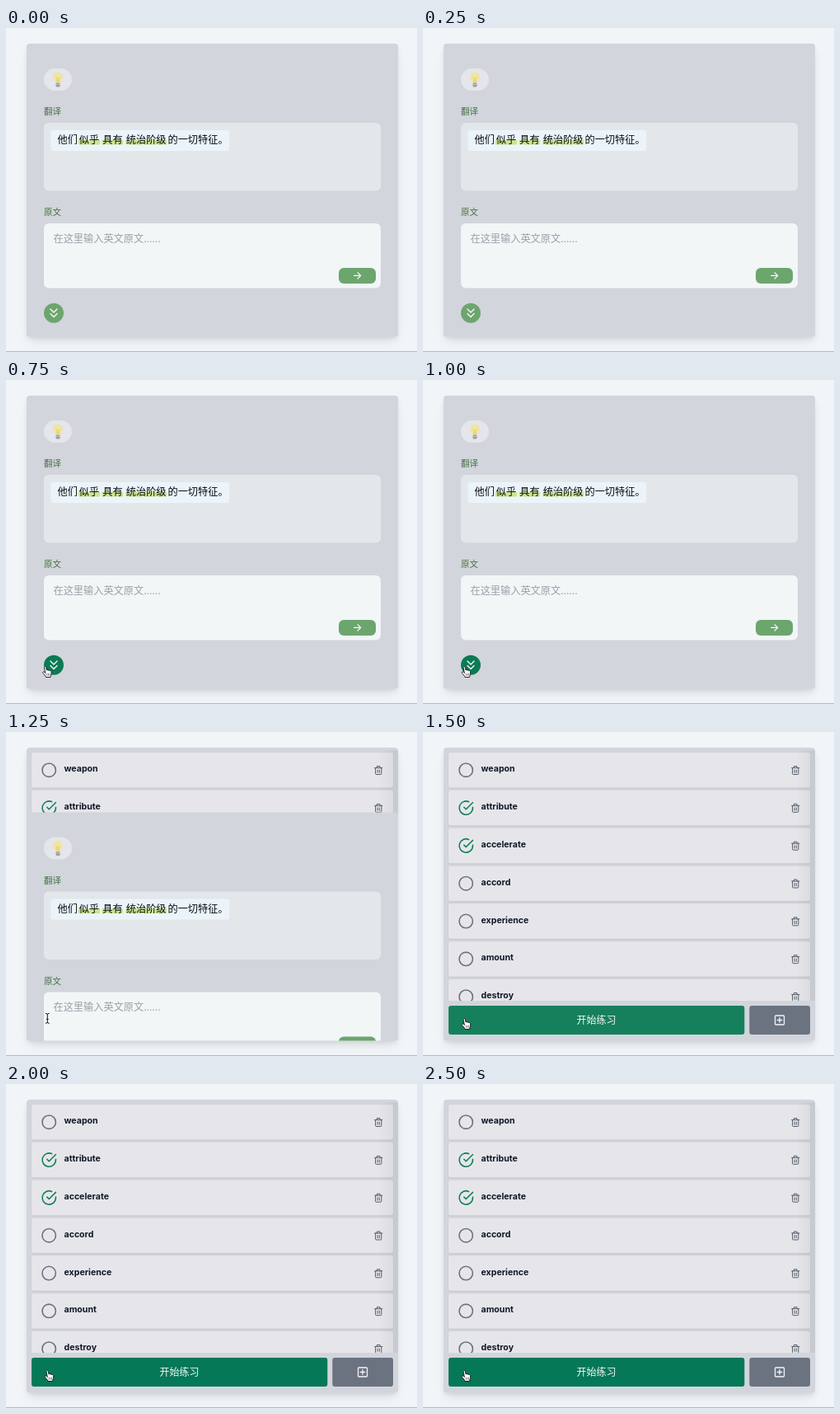
Animation of 499 by 393 pixels, one loop 2.75 s. Source, as an HTML page with a canvas:

```html
<!DOCTYPE html>
<html lang="zh-CN">
<head>
<meta charset="utf-8">
<title>Word practice</title>
<style>
html, body { margin: 0; width: 100%; height: 100%; overflow: hidden; background: #f1f5f7; }
canvas { display: block; width: 499px; height: 393px; }
</style>
</head>
<body>
<canvas id="stage"></canvas>
<script>
const W = 499, H = 393, LOOP = 2750, STEP = 250;
const CJK = '"Noto Sans CJK SC", "Noto Sans CJK", sans-serif';
const LATIN = 'Inter, sans-serif';
const COLOR = {
  page: '#f1f5f7', card: '#d2d5dc', row: '#e6e6ea', field: '#e4e7ea', input: '#f2f6f7',
  label: '#42703f', leaf: '#6da56e', hover: '#0b7a55', deep: '#047857', gray: '#6b7280'
};
const WORDS = ['weapon', 'attribute', 'accelerate', 'accord', 'experience', 'amount', 'destroy'];
const CHECKED = new Set([1, 2]);
const CARD = [25, 19, 451, 355.5, 4];

const canvas = document.getElementById('stage');
const ctx = canvas.getContext('2d');
const ratio = window.devicePixelRatio || 1;
canvas.width = W * ratio;
canvas.height = H * ratio;

function box(x, y, w, h, r, fill) {
  ctx.beginPath();
  ctx.roundRect(x, y, w, h, r);
  ctx.fillStyle = fill;
  ctx.fill();
}

function text(str, x, y, size, fill, { weight = 400, family = CJK, align = 'left' } = {}) {
  ctx.font = `${weight} ${size}px ${family}`;
  ctx.textAlign = align;
  ctx.fillStyle = fill;
  ctx.fillText(str, x, y);
}

// Stroke and optionally fill an SVG path placed at x, y.
function path(d, x, y, scale, stroke, width, fill) {
  const shape = new Path2D(d);
  ctx.save();
  ctx.translate(x, y);
  ctx.scale(scale, scale);
  ctx.lineCap = ctx.lineJoin = 'round';
  ctx.strokeStyle = stroke;
  ctx.lineWidth = width / scale;
  if (fill) {
    ctx.fillStyle = fill;
    ctx.fill(shape);
  }
  ctx.stroke(shape);
  ctx.restore();
}

function withShadow(color, blur, dy, draw) {
  ctx.save();
  ctx.shadowColor = color;
  ctx.shadowBlur = blur * ratio;
  ctx.shadowOffsetY = dy * ratio;
  draw();
  ctx.restore();
}

function drawPage() {
  ctx.fillStyle = COLOR.page;
  ctx.fillRect(0, 0, W, H);
  withShadow('rgba(0,0,0,.1)', 14, 7, () => box(28, 22, 445, 350, 4, COLOR.card));
  withShadow('rgba(0,0,0,.05)', 5, 3, () => box(...CARD, COLOR.card));
  ctx.fillStyle = '#b5b8ba';
  ctx.fillRect(0, 392, W, 1);
}

function drawBulb(x, y) {
  const glass = ctx.createRadialGradient(x, y, 1, x, y, 6);
  glass.addColorStop(0, '#fffde4');
  glass.addColorStop(1, '#f0e79c');
  path('M-2.5 6C-2.5 3-5.5 2.5-5.5-1A5.5 5.5 0 0 1 5.5-1C5.5 2.5 2.5 3 2.5 6Z',
    x, y, 1, '#e5dda0', 0.5, glass);
  path('M-1 5V1L-2-1M1 5V1L2-1', x, y, 1, '#d5b45c', 0.6);
  box(x - 2.5, y + 6, 5, 5, 1.5, '#9a9d9f');
  path('M-2 8H2', x, y, 1, '#d1d3d4', 0.7);
}

function drawPanel(dy, buttonColor) {
  ctx.save();
  ctx.translate(0, dy);
  box(...CARD, COLOR.card);

  box(46, 49, 34, 27, 13.5, '#e5e6e9');
  drawBulb(63, 60.5);

  text('翻译', 46, 105.3, 10.5, COLOR.label);
  box(46, 115, 409, 82.5, 6, COLOR.field);
  box(54.5, 124, 216.5, 25, 3, '#ecf4fb');
  for (const [x, w] of [[88, 26], [116.5, 25.5], [145.5, 49.5]]) {
    box(x, 135.5, w, 6, 1, '#c9e48f');
  }
  [['他们', 62.5], ['似乎', 88.7], ['具有', 117.2], ['统治阶级', 145.8], ['的一切特征。', 196.5]]
    .forEach(([part, x]) => text(part, x, 140.4, 12.2, '#0b0d10'));

  text('原文', 46, 227.3, 10.5, COLOR.label);
  box(46, 237, 409, 78.5, 6, COLOR.input);
  text('在这里输入英文原文......', 57.5, 259.7, 12.2, '#9aa0a9');

  box(404, 291, 45, 19, 6, COLOR.leaf);
  path('M-4 0H4M.5-3.7 4.2 0 .5 3.7', 426.5, 300.3, 1, '#f4f8f4', 1.2);

  box(46, 333.7, 24, 24, 12, buttonColor);
  path('M-4-4.8 0-.8 4-4.8M-4 .8 0 4.8 4 .8', 58, 345.7, 1, '#f4f8f4', 1.4);
  ctx.restore();
}

function drawRow(word, i) {
  const y = 25 + i * 45.83;
  withShadow('rgba(0,0,0,.07)', 2, 1, () => box(31, y, 439, 42.5, 2, COLOR.row));
  if (CHECKED.has(i)) {
    path('M22 11.08V12a10 10 0 1 1-5.93-9.14M22 4 12 14 9 11', 42.4, y + 11.4, 0.82, '#15805b', 1.6);
  } else {
    path('M-8.2 0a8.2 8.2 0 1 0 16.4 0a8.2 8.2 0 1 0-16.4 0', 52.2, y + 21.2, 1, COLOR.gray, 1.6);
  }
  text(word, 70.5, y + 23.2, 10.6, '#111827', { weight: 700, family: LATIN });
  path('M-4.6-3H4.6M-1.8-3V-5H1.8V-3M-3.6-3V4Q-3.6 5-2.6 5H2.6Q3.6 5 3.6 4V-3M-1.1-.5V2.8M1.1-.5V2.8',
    452.2, y + 21.5, 1, '#555c68', 1);
}

function drawList(startColor) {
  ctx.save();
  ctx.beginPath();
  ctx.rect(25, 19, 451, 307);
  ctx.clip();
  WORDS.forEach(drawRow);
  const shade = ctx.createLinearGradient(452, 0, 476, 0);
  shade.addColorStop(0, 'rgba(40,40,50,0)');
  shade.addColorStop(1, 'rgba(40,40,50,.07)');
  ctx.fillStyle = shade;
  ctx.fillRect(452, 22, 24, 304);
  ctx.restore();

  box(31, 332, 359.3, 35, 3, startColor);
  text('开始练习', 210.5, 354.2, 12, '#f5faf8', { weight: 500, align: 'center' });
  box(396.3, 332, 73.7, 35, 3, COLOR.gray);
  path('M-4.5-5.5H4.5Q5.5-5.5 5.5-4.5V4.5Q5.5 5.5 4.5 5.5H-4.5Q-5.5 5.5-5.5 4.5V-4.5Q-5.5-5.5-4.5-5.5ZM-2.8 0H2.8M0-2.8V2.8',
    433, 349.5, 1, '#f3f4f6', 1.3);
}

const cursors = {
  arrow(x, y) {
    path('M0 0V11.5L2.7 9 4.6 13.4 6.6 12.5 4.7 8.3H8.3Z', x, y, 1, '#fff', 0.9, '#000');
  },
  hand(x, y) {
    path('M0 1C0-.6 2-.6 2.2 1L3 4.6C3.4 3.6 4.9 3.7 5.1 4.9 5.6 4.1 6.8 4.3 7 5.3 7.6 4.8 8.6 5.2 8.6 6.3V9C8.6 10.5 7.5 11.4 7.5 13H2C1.6 11.2-.4 9.8-1.6 7.9-2.4 6.6-.9 5.8.2 6.9L1.1 7.8Z',
      x, y, 1, '#111', 0.9, '#fff');
    path('M3.2 8.5V11M5 8.5V11M6.7 8.5V11', x, y, 1, '#111', 0.5);
  },
  beam(x, y) {
    const d = 'M-2-6Q0-6 0-4.8Q0-6 2-6M0-5V5M-2 6Q0 6 0 4.8Q0 6 2 6M-1 1H1';
    path(d, x, y, 1, 'rgba(255,255,255,.7)', 2);
    path(d, x, y, 1, '#111', 1);
  }
};

const SCENES = [
  { at: 0, slide: 0, button: COLOR.leaf },
  { at: 500, slide: 0, button: COLOR.leaf, cursor: ['arrow', 62.7, 366.2] },
  { at: 750, slide: 0, button: COLOR.hover, cursor: ['hand', 46.5, 347.5] },
  { at: 1000, slide: 0, button: COLOR.hover, cursor: ['hand', 49, 347.5] },
  { at: 1250, slide: 78.4, button: COLOR.leaf, start: '#15805b', cursor: ['beam', 50.3, 347.3] },
  { at: 1500, start: '#15805b', cursor: ['hand', 49, 347.5] },
  { at: 1750, start: COLOR.deep, cursor: ['hand', 49, 347.5] }
];

function render(now) {
  const time = Math.floor((now % LOOP) / STEP) * STEP;
  const scene = SCENES.findLast(s => s.at <= time);
  ctx.setTransform(ratio, 0, 0, ratio, 0, 0);
  drawPage();
  ctx.save();
  ctx.beginPath();
  ctx.roundRect(...CARD);
  ctx.clip();
  if (scene.start) drawList(scene.start);
  if (scene.slide !== undefined) drawPanel(scene.slide, scene.button);
  ctx.restore();
  if (scene.cursor) {
    const [kind, x, y] = scene.cursor;
    cursors[kind](x, y);
  }
}

const begin = performance.now();
function tick() {
  render(performance.now() - begin);
  requestAnimationFrame(tick);
}
tick();
</script>
</body>
</html>
```
